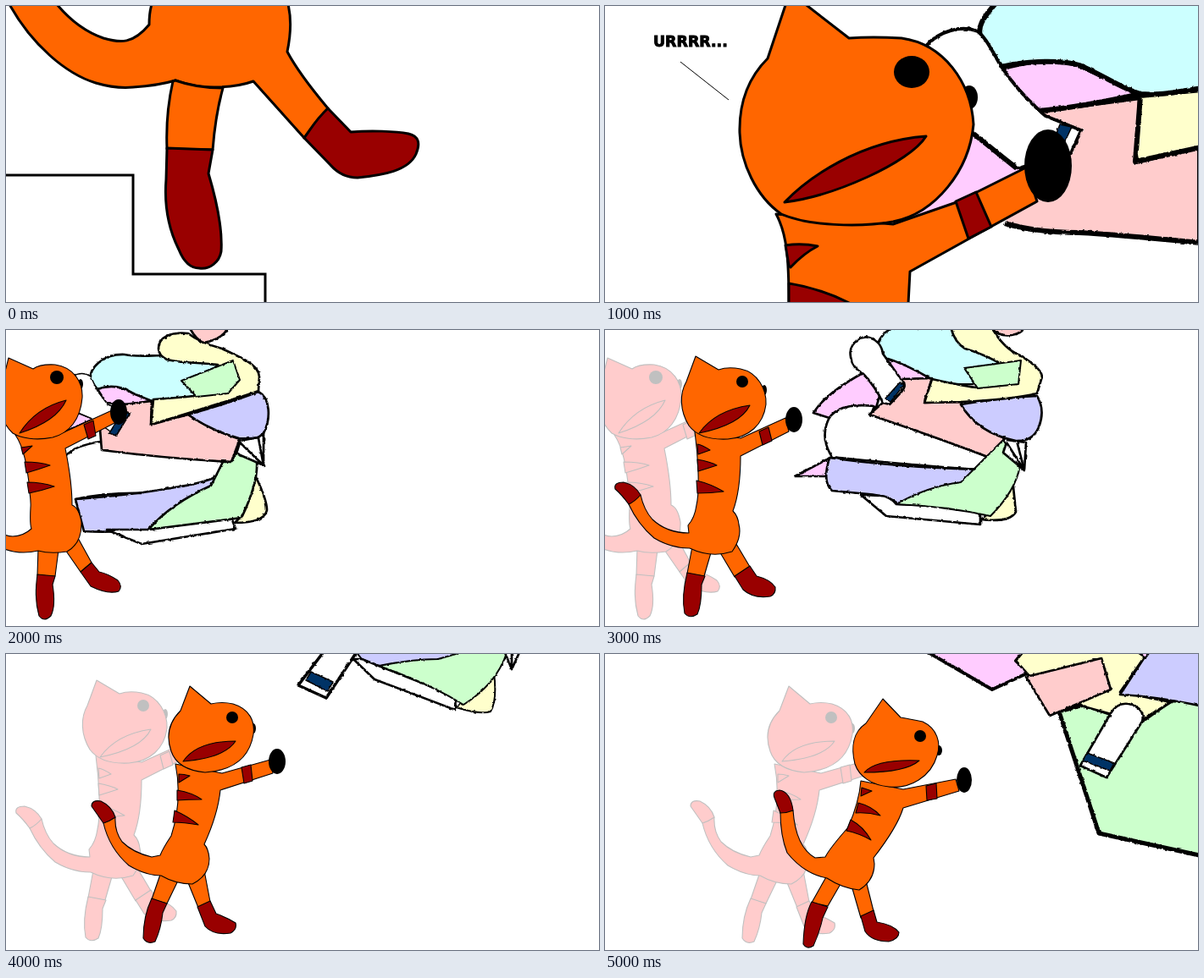
Animation of 700x350 px, one loop 6000 ms. Source, as an HTML page:

```html
<!DOCTYPE html>
<html lang="en">
<head>
<meta charset="utf-8">
<title>Orange cat and books</title>
<style>
html, body { margin: 0; width: 100%; height: 100%; overflow: hidden; background: #fff; }
svg { display: block; width: 700px; height: 350px; }
.scene { display: none; }
.scene.on { display: inline; }
.cat { --body: #f60; --dark: #900; --ink: #000; }
.ghost { --body: #fcc; --dark: #fcc; --ink: #c0c0c0; }
.coat { fill: var(--body); stroke: var(--ink); }
.trim { fill: var(--dark); stroke: var(--ink); }
.dot { fill: var(--ink); }
.cat, .ghost { stroke-width: 1.1; stroke-linejoin: round; }
.big { stroke-width: 3; }
.books { stroke: #000; stroke-width: 2.7; stroke-linejoin: round; filter: url(#rough); }
.cyan { fill: #cff; } .lilac { fill: #fcf; } .pink { fill: #fcc; } .yellow { fill: #ffc; }
.blue { fill: #ccf; } .green { fill: #cfc; } .white { fill: #fff; } .navy { fill: #036; stroke-width: 1.5; }
.line { fill: none; stroke: #000; }
text { font: bold 17.4px "DejaVu Sans", sans-serif; stroke: #000; stroke-width: .9; }
</style>
</head>
<body>
<svg viewBox="0 0 700 350">
<defs>
  <filter id="rough" filterUnits="userSpaceOnUse" x="0" y="0" width="700" height="350" color-interpolation-filters="sRGB">
    <feTurbulence type="fractalNoise" baseFrequency=".25" numOctaves="1" seed="4"/>
    <feDisplacementMap in="SourceGraphic" scale="3" xChannelSelector="R" yChannelSelector="G"/>
  </filter>

  <g id="catA">
    <path class="coat" d="M38,258L37,290L58,291L62,260ZM70,260L88,286L101,275L85,246Z"/>
    <path class="trim" d="M37,289L58,291L55,301C58,320 57,330 53,338Q45,346 39,338C34,320 35,305 37,289ZM101,275L110,286Q120,288 132,296Q138,303 133,309Q120,313 100,303L88,286Z"/>
    <path class="coat" d="M11,124C22,140 25,165 27,180C27,190 30,200 29,210Q28,230 30,235Q20,244 8,244Q0,244 -4,240V258C10,264 25,264 38,261Q52,265 72,262Q90,252 89,227Q86,210 78,207Q78,180 70,140L132,108L125,95L66,122Z"/>
    <path class="trim" d="M18,139L31,137L20,147ZM22,156Q40,156 52,160Q38,165 24,169ZM25,180Q42,180 57,185Q42,190 27,193ZM92,112L103,107L106,125L97,129Z"/>
    <ellipse class="dot" cx="88" cy="64" rx="3" ry="6"/>
    <path class="coat" d="M3,33L32,46Q40,40 58,41C80,44 91,62 90,80C88,105 75,122 55,127C35,131 18,128 8,122C-5,110 -10,90 -10,75C-8,60 -2,52 0,45Z"/>
    <path class="trim" d="M16,122Q35,92 71,83Q60,108 16,122Z"/>
    <circle class="dot" cx="60" cy="56" r="8"/>
    <ellipse class="dot" cx="133" cy="97" rx="10" ry="15"/>
  </g>

  <g id="catB">
    <path class="coat" d="M103,256L97,288L117,291L126,260ZM134,260L153,292L171,280L152,248Z"/>
    <path class="trim" d="M97,287L118,291L114,301Q114,325 109,336Q100,342 94,335Q90,315 97,287ZM171,279L179,291Q195,295 201,304Q202,312 195,315Q175,318 163,307L153,291Z"/>
    <path class="coat" d="M106,120C110,150 112,190 108,207Q106,222 98,231L99,240Q73,240 56,224Q46,213 42,195L28,206Q39,230 58,246Q78,258 100,258Q125,270 150,262Q162,245 158,230Q157,220 151,214Q160,190 160,149L217,120L213,104L160,128Z"/>
    <path class="trim" d="M42,195Q35,183 22,180Q10,180 12,188Q20,195 28,206Q35,203 42,195ZM109,135Q115,136 124,142L110,147ZM109,153Q125,156 132,160Q120,164 110,167ZM108,178Q125,182 140,191Q125,193 109,193ZM182,120L193,115L197,131L186,136Z"/>
    <ellipse class="dot" cx="188" cy="71" rx="3" ry="6"/>
    <path class="coat" d="M107,31L134,47Q145,43 160,46C180,50 191,70 190,88C187,112 170,127 145,129C125,130 108,125 99,113C88,95 88,75 96,61Z"/>
    <path class="trim" d="M111,122Q130,95 171,89Q160,112 111,122Z"/>
    <circle class="dot" cx="162" cy="61" r="7"/>
    <ellipse class="dot" cx="223" cy="106" rx="10" ry="15"/>
  </g>

  <g id="catC">
    <path class="coat" d="M183,258L172,290L190,295L204,266ZM214,268L227,300L241,293L234,256Z"/>
    <path class="trim" d="M172,289L190,295L185,306Q183,325 176,340Q167,344 162,336Q162,310 172,289ZM241,292L248,307Q262,312 271,318Q273,326 265,330Q245,333 235,322L226,299Z"/>
    <path class="coat" d="M200,130C206,160 203,190 195,215Q185,230 182,238L172,240Q150,235 137,222Q128,210 129,193L115,200Q122,230 145,250Q165,262 183,262Q200,272 220,272Q240,262 240,242Q239,230 234,225Q250,190 253,161L315,141L312,125L255,141Z"/>
    <path class="trim" d="M129,193Q125,180 112,174Q101,172 101,180Q108,190 115,200Q122,198 129,193ZM204,142Q210,142 217,144L204,152ZM202,161Q220,164 231,172Q215,172 202,173ZM199,185Q215,192 227,202Q210,199 197,199ZM278,134L289,131L291,150L281,153Z"/>
    <ellipse class="dot" cx="292" cy="88" rx="3" ry="6"/>
    <path class="coat" d="M217,38L242,59Q255,56 268,59C288,65 294,80 292,95C287,125 265,138 235,140C215,138 200,130 195,115C188,95 193,80 206,67Z"/>
    <path class="trim" d="M209,127Q225,103 271,103Q258,123 209,127Z"/>
    <circle class="dot" cx="267" cy="75" r="7"/>
    <ellipse class="dot" cx="320" cy="127" rx="10" ry="15"/>
  </g>

  <g id="catD">
    <path class="coat" d="M262,262L244,294L263,298L278,272ZM291,274L302,312L317,304L308,268Z"/>
    <path class="trim" d="M244,293L263,299L257,312Q253,330 246,345Q238,350 234,343Q235,310 244,293ZM317,303L321,317Q340,320 347,329Q347,337 335,340Q315,340 307,328L302,310Z"/>
    <path class="coat" d="M302,150Q300,175 287,205Q265,230 260,240L248,241Q225,228 222,185L207,187Q207,215 215,235Q235,260 262,265Q280,277 300,279Q318,268 318,248L317,241Q345,205 352,182L418,162L414,148L352,160Z"/>
    <path class="trim" d="M222,185Q219,163 206,161Q197,162 200,170L207,188Q215,188 222,185ZM303,158L315,162L302,168ZM299,176Q315,180 325,191Q310,187 296,188ZM290,196Q305,204 314,220Q300,212 285,209ZM379,156L391,153L392,171L380,173Z"/>
    <ellipse class="dot" cx="394" cy="114" rx="4" ry="6"/>
    <path class="coat" d="M328,53L349,75Q360,77 375,80C392,88 397,105 392,120C385,145 360,160 335,157C315,155 300,145 295,130C290,110 293,92 308,82Z"/>
    <path class="trim" d="M306,140Q320,124 371,126Q355,140 306,140Z"/>
    <circle class="dot" cx="372" cy="97" r="7"/>
    <ellipse class="dot" cx="424" cy="149" rx="9" ry="15"/>
  </g>
</defs>

<!-- Stairs -->
<g class="scene">
  <path class="line" stroke-width="3" d="M-2,200H150V317H306V352"/>
  <g class="cat big">
    <path class="coat" d="M4,-2C30,45 70,80 106,91Q130,98 150,96Q180,94 200,88Q215,94 235,96Q270,97 292,89L352,156L380,121C360,97 343,75 332,54C336,35 337,15 333,-2L172,-2Q169,8 169,22C150,45 135,44 115,38C92,30 75,16 60,-2Z"/>
    <path class="coat" d="M197,89C190,120 189,145 190,169L244,170Q247,130 256,97Q225,97 200,88Z"/>
    <path class="trim" d="M190,168L244,170L239,198C247,225 256,260 254,290C252,303 240,312 228,310C215,310 208,298 204,288C190,260 187,230 189,205ZM380,121L407,149C430,147 460,148 475,151C488,154 489,163 484,175C475,195 445,200 415,203C400,203 390,196 383,188L352,156C362,142 366,134 380,121Z"/>
  </g>
</g>

<!-- Close-up -->
<g class="scene">
  <g class="books" style="stroke-width:6">
    <path class="pink" d="M512,124L632,108L628,184L702,165V280Q600,270 560,268Q510,268 472,257"/>
    <path class="yellow" d="M632,106L704,99V167L626,184Z"/>
    <path class="lilac" d="M468,74Q520,58 560,70L632,104Q560,120 512,124Q485,100 468,74Z"/>
    <path class="cyan" d="M462,-4C445,15 440,25 443,35L468,72C500,64 540,64 560,70C585,80 610,98 632,104C660,106 680,100 706,97V-4Z"/>
    <path class="lilac" stroke="none" d="M430,145L490,192L500,205L415,242L335,266Z"/>
    <path class="white" stroke-width="4" d="M380,46C395,30 420,22 440,30C450,38 455,50 468,72Q490,105 520,130L562,147L550,174L488,192L435,152Z"/>
    <path class="line" d="M435,151L486,192"/>
    <path class="navy" d="M537,140L551,143L542,162L531,156Z"/>
  </g>
  <g class="cat big">
    <path class="coat" d="M202,246C215,270 217,300 217,352H358L360,314L430,275L510,231L497,191L415,232L340,258Z"/>
    <path class="trim" d="M414,231L438,220L456,261L429,275ZM213,283Q232,280 251,284Q235,292 219,309L217,307ZM217,328Q255,334 290,352H217Z"/>
    <ellipse class="dot" cx="430" cy="108" rx="10" ry="14"/>
    <path class="coat" d="M214,-4L192,62C172,82 158,110 159,150C160,185 178,225 208,246C240,260 300,262 340,255C390,245 430,195 435,140C432,90 400,45 350,38Q315,36 288,38L234,-4Z"/>
    <path class="trim" d="M212,232C240,203 300,160 379,154C360,185 270,225 212,232Z"/>
    <ellipse class="dot" cx="362" cy="78" rx="21" ry="19"/>
    <ellipse class="dot" cx="523" cy="189" rx="28" ry="43"/>
  </g>
  <text x="57" y="48">URRRR...</text>
  <path class="line" d="M89,66L146,111"/>
</g>

<!-- Cat holding the pile -->
<g class="scene">
  <g class="books">
    <path class="cyan" d="M100,60C97,45 115,28 140,29C155,32 170,30 190,30L250,42L222,78Q195,85 172,84Q158,80 150,75Q135,66 108,70Z"/>
    <path class="lilac" d="M108,70Q130,62 150,75L172,84L143,88L118,86Z"/>
    <path class="pink" d="M140,88L172,84L171,112L215,100Q245,120 276,129L266,156Q190,152 113,142L110,105Z"/>
    <path class="blue" d="M215,100C240,93 280,80 298,73C312,80 313,105 304,122Q300,130 275,128Q240,118 215,100Z"/>
    <path class="yellow" d="M180,22C180,8 195,2 215,4C225,12 240,18 255,22C275,32 298,40 299,55L298,72C270,82 215,98 171,112L174,82Q205,80 222,78L250,41C230,38 210,40 190,35Q180,30 180,22Z"/>
    <path class="green" stroke-width="2" d="M207,60L268,36L276,59L262,75L225,79Z"/>
    <path class="pink" d="M217,-2Q225,12 233,15Q255,12 263,-4Z"/>
    <path class="blue" d="M82,200Q150,195 200,186Q230,182 250,173L240,186Q190,215 170,236Q120,240 92,238Z"/>
    <path class="yellow" d="M294,172Q308,200 308,213Q305,228 270,228L278,220Z"/>
    <path class="white" d="M118,236L160,253L271,235L266,222L168,236Z"/>
    <path class="green" d="M168,236Q195,205 242,184L256,156L266,156L272,144L296,155Q298,180 278,222Z"/>
    <path class="white" d="M276,131L298,127L304,122V160L272,146L276,133L304,160L298,128"/>
    <path class="lilac" d="M78,95L104,105L66,122Z"/>
    <path class="white" stroke-width="1.5" d="M78,55Q90,48 100,55L108,72L120,88L146,98L130,125L104,106L78,95Z"/>
    <path class="navy" d="M122,122L130,125L146,99L138,96Z"/>
    <path class="line" d="M72,148Q80,137 112,132M82,200Q120,192 160,193"/>
  </g>
  <use href="#catA" class="cat"/>
</g>

<!-- Pile thrown -->
<g class="scene">
  <use href="#catA" class="ghost"/>
  <g class="books">
    <path class="lilac" d="M306,50L325,75L320,92Q290,88 265,104L246,98Q260,75 306,50ZM224,173L266,151L262,173ZM328,32Q350,28 362,42L385,58Q360,56 350,62Z"/>
    <path class="cyan" d="M322,16C330,-3 345,-5 355,-2L410,-2Q415,15 450,22Q465,30 464,40L434,64Q400,66 385,58Q355,40 328,32Z"/>
    <path class="white" d="M262,110Q270,85 318,90L314,100Q400,130 457,152L440,165Q340,158 268,150Q255,130 262,110Z"/>
    <path class="pink" d="M350,58L386,57L377,86L420,85Q440,115 472,128L457,152Q400,130 312,100L328,86Z"/>
    <path class="blue" d="M420,88Q470,80 510,78Q520,95 512,115Q505,132 485,131Q440,122 420,88ZM265,151Q340,162 444,165L418,186L345,205Q335,195 300,193L268,190Q256,180 265,151Z"/>
    <path class="yellow" d="M408,-4H456Q470,22 490,30Q515,45 516,55L510,75Q480,82 420,85L377,86L386,58Q430,68 440,68L464,38Q445,28 425,22Q412,14 408,-4ZM481,176L485,215Q478,228 444,224L455,215Z"/>
    <path class="green" stroke-width="2" d="M424,45L491,36L488,64L440,69Z"/>
    <path class="pink" d="M456,-2Q465,8 480,6Q492,4 494,-2Z"/>
    <path class="white" d="M302,195L332,220L443,230V214Q400,208 344,206Q335,196 325,196Z"/>
    <path class="green" stroke-width="2" d="M344,206Q380,185 420,180L470,130L490,160Q485,190 455,220Q400,208 344,206Z"/>
    <path class="white" d="M474,130L497,133L495,166L470,145L474,133L495,166L486,131"/>
    <path class="white" d="M290,32C287,18 300,6 312,9C322,12 327,20 328,28L352,62Q356,66 350,73L336,88L328,86Q320,68 305,52Q292,45 290,32Z"/>
    <path class="navy" d="M331,81L348,62L353,65L337,85Z"/>
  </g>
  <use href="#catB" class="cat"/>
</g>

<!-- Pile rising -->
<g class="scene">
  <use href="#catB" class="ghost"/>
  <g class="books">
    <path class="blue" stroke-width="2" d="M412,-4L420,6L440,14L520,8L542,-4Z"/>
    <path class="yellow" stroke-width="2" d="M576,22Q580,55 572,68Q560,72 531,63L545,50Z"/>
    <path class="white" d="M410,6L435,30L530,66L531,50L440,14L420,6Z"/>
    <path class="green" stroke-width="2" d="M440,14Q480,6 510,6L545,-4H592Q580,35 540,60Q500,35 440,14Z"/>
    <path class="white" d="M588,-4L597,18L607,-4M597,18V-4"/>
    <path class="white" stroke-width="3.5" d="M376,-4L345,37L378,52L415,-4Z"/>
    <path class="navy" d="M360,21L386,33L380,44L354,31Z"/>
  </g>
  <use href="#catC" class="cat"/>
</g>

<!-- Pile beyond -->
<g class="scene">
  <use href="#catC" class="ghost"/>
  <g class="books">
    <path class="lilac" stroke-width="4" d="M378,-4L457,42L500,22L485,8L495,-4Z"/>
    <path class="green" stroke-width="5" d="M536,68L583,212L706,239V55L668,55L630,82L565,60Z"/>
    <path class="yellow" d="M495,-4L485,8L500,25L565,62L630,80L668,57L608,45L642,-4Z"/>
    <path class="pink" d="M497,27L586,5L597,42L525,73Z"/>
    <path class="blue" d="M642,-4L608,48Q650,50 706,62V-4Z"/>
    <path class="lilac" d="M626,-4L638,4L644,-4Z"/>
    <path class="white" d="M597,70Q606,55 622,60Q638,66 634,80L592,146L561,132Z"/>
    <path class="navy" d="M569,117L601,129L596,138L564,126Z"/>
  </g>
  <use href="#catD" class="cat"/>
</g>
</svg>
<script>
const scenes = [...document.querySelectorAll(".scene")];
const sceneTime = 1000;

function draw() {
  const current = Math.floor(performance.now() / sceneTime) % scenes.length;
  scenes.forEach((scene, i) => scene.classList.toggle("on", i === current));
  requestAnimationFrame(draw);
}
draw();
</script>
</body>
</html>
```
